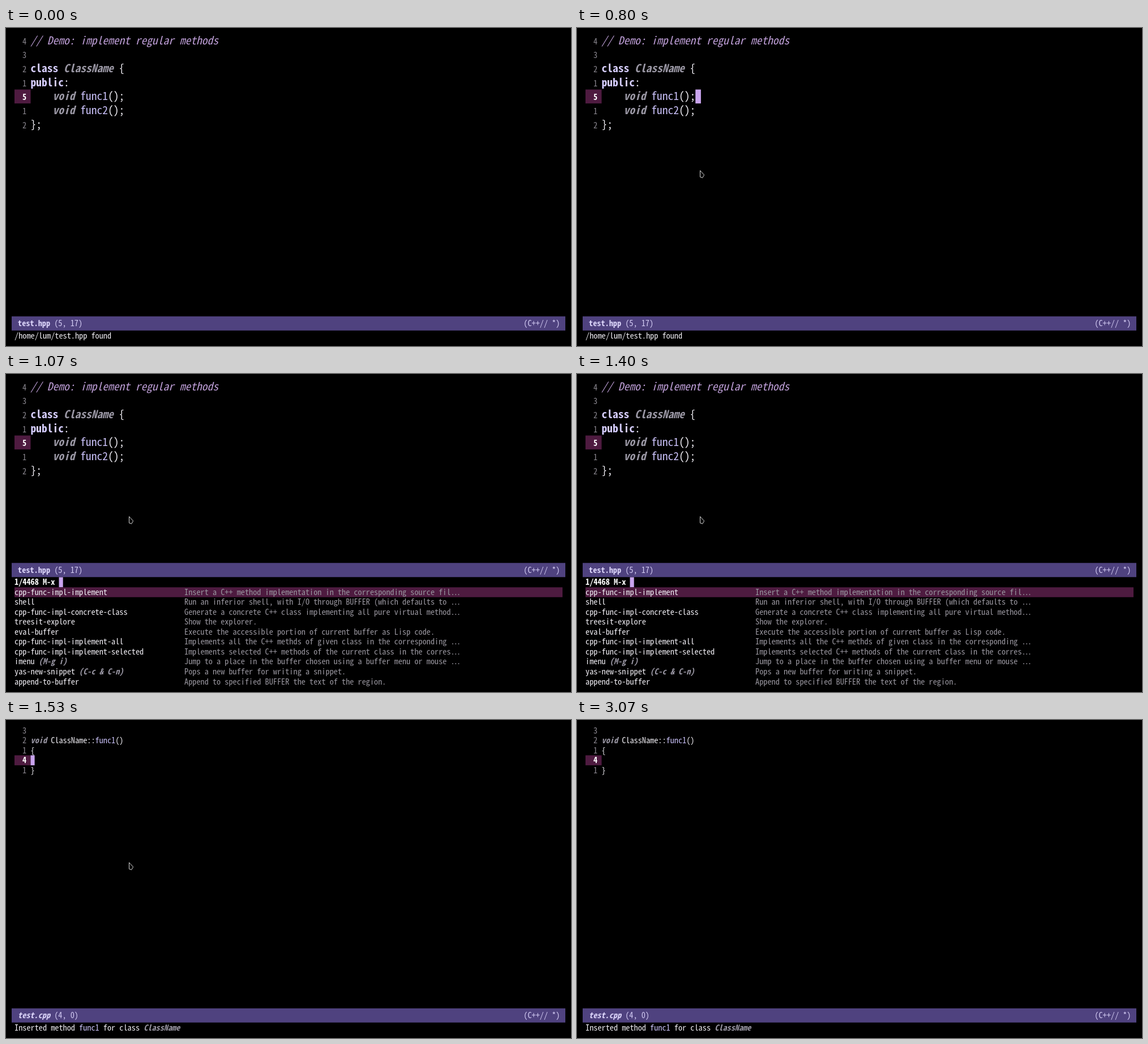
These frames come from a looping animation (998x561 px, 3740 ms). An HTML page:

```html
<!DOCTYPE html>
<html lang="en">
<head>
<meta charset="utf-8">
<title>Implement regular methods</title>
<style>
  html, body { margin: 0; width: 100%; height: 100%; overflow: hidden; background: #000; }
  svg { display: block; width: 100%; height: 100%; }
  text {
    font-family: "Noto Sans Mono CJK JP", "Noto Sans Mono CJK SC", "Noto Sans Mono", "DejaVu Sans Mono", monospace;
    font-variant-ligatures: none;
    white-space: pre;
  }
  .plain { fill: #f0eef4; }
  .name { fill: #c9c0f8; }
  .key { fill: #d6ceff; font-weight: 700; }
  .type { fill: #9a97a4; font-weight: 700; font-style: italic; }
  .note { fill: #bf9fd8; font-style: italic; }
  .dim { fill: #98959e; }
  .num { fill: #8c8991; }
  .now { fill: #fff; font-weight: 700; }
  .bar { fill: #d5cdf5; }
  .file { fill: #dcd5fa; font-weight: 700; }
  .fileNew { fill: #dcd5fa; font-weight: 700; font-style: italic; }
</style>
</head>
<body>
<svg id="stage" viewBox="0 0 998 561"></svg>
<script>
const NS = "http://www.w3.org/2000/svg";
const stage = document.getElementById("stage");
const LOOP = 3740;
const SMALL = 7.13, LARGE = 9.75;
const ROW = 17.55, TALL_ROW = 24.7;
const LEFT = 15, CODE = 43.5;
const WINE = "#4e1b40", LILAC = "#c9a4ee", VIOLET = "#4f427f";

function add(parent, tag, attrs) {
  const el = document.createElementNS(NS, tag);
  for (const k in attrs) el.setAttribute(k, attrs[k]);
  return parent.appendChild(el);
}

const group = () => add(stage, "g", {});

const rect = (parent, x, y, width, height, fill) =>
  add(parent, "rect", { x, y, width, height, fill });

// Font size per unit of pitch: half-width fonts fit at 2, wider ones need less.
function sizeRatio() {
  const probe = add(stage, "text", { "font-size": 100 });
  probe.textContent = "method";
  const advance = probe.getComputedTextLength() / 600;
  probe.remove();
  return advance < 0.55 ? 2 : 1.85;
}
const RATIO = sizeRatio();

// Writes [class, text] runs on a character grid of the given pitch.
function write(parent, x, y, pitch, ...runs) {
  let col = 0;
  for (const [cls, str] of runs) {
    const el = add(parent, "text", {
      x: x + col * pitch, y, class: cls, "font-size": pitch * RATIO
    });
    el.textContent = str;
    const natural = el.getComputedTextLength() / str.length;
    el.style.letterSpacing = (pitch - natural) + "px";
    col += str.length;
  }
}

function modeLine(parent, y, cls, file, pos) {
  rect(parent, 10, y, 978, 25, VIOLET);
  write(parent, 21, y + 17.4, SMALL, [cls, file], ["bar", " " + pos]);
  write(parent, 914.3, y + 17.4, SMALL, ["bar", "(C++// *)"]);
}

function lineNumbers(parent, labels, current, y, step) {
  labels.forEach((label, i) =>
    write(parent, 29, y + i * step, SMALL, [i === current ? "now" : "num", label]));
}

// Header buffer
const header = group();
rect(header, LEFT, 108.5, 28.5, 24.6, WINE);
lineNumbers(header, ["4", "3", "2", "1", "5", "1", "2"], 4, 28.5, TALL_ROW);
[
  [["note", "// Demo: implement regular methods"]],
  [],
  [["key", "class"], ["plain", " "], ["type", "ClassName"], ["plain", " {"]],
  [["key", "public"], ["plain", ":"]],
  [["plain", "    "], ["type", "void"], ["plain", " "], ["name", "func1"], ["plain", "();"]],
  [["plain", "    "], ["type", "void"], ["plain", " "], ["name", "func2"], ["plain", "();"]],
  [["plain", "};"]]
].forEach((runs, i) => write(header, CODE, 28.5 + i * TALL_ROW, LARGE, ...runs));

const headerCursor = rect(stage, 209.2, 108.5, 9.7, 24.6, LILAC);

const found = group();
modeLine(found, 508.7, "file", "test.hpp", "(5, 17)");
write(found, LEFT, 547.7, SMALL, ["plain", "/home/lum/test.hpp found"]);

// Command list
const menu = group();
modeLine(menu, 333.3, "file", "test.hpp", "(5, 17)");
rect(menu, LEFT, 376.3, 968, 17.4, WINE);
write(menu, LEFT, 372, SMALL, ["now", "1/4468 M-x"]);
rect(menu, 93.5, 358.5, 7.2, 17.6, LILAC);
[
  ["cpp-func-impl-implement", "", "Insert a C++ method implementation in the corresponding source fil", 1],
  ["shell", "", "Run an inferior shell, with I/O through BUFFER (which defaults to ", 1],
  ["cpp-func-impl-concrete-class", "", "Generate a concrete C++ class implementing all pure virtual method", 1],
  ["treesit-explore", "", "Show the explorer."],
  ["eval-buffer", "", "Execute the accessible portion of current buffer as Lisp code."],
  ["cpp-func-impl-implement-all", "", "Implements all the C++ methds of given class in the corresponding ", 1],
  ["cpp-func-impl-implement-selected", "", "Implements selected C++ methods of the current class in the corres", 1],
  ["imenu", "(M-g i)", "Jump to a place in the buffer chosen using a buffer menu or mouse ", 1],
  ["yas-new-snippet", "(C-c & C-n)", "Pops a new buffer for writing a snippet."],
  ["append-to-buffer", "", "Append to specified BUFFER the text of the region."]
].forEach(([command, keys, about, cut], i) => {
  const y = 372 + (i + 1) * ROW;
  write(menu, LEFT, y, SMALL, ["plain", command]);
  if (keys) write(menu, LEFT + (command.length + 1) * SMALL, y, SMALL, ["type", keys]);
  write(menu, 315, y, SMALL, ["dim", about]);
  if (cut) [0, 5.2, 10.4].forEach(dx => write(menu, 785.5 + dx, y, SMALL, ["dim", "."]));
});

// Source buffer
const source = group();
rect(source, LEFT, 62.3, 28.5, 17.6, WINE);
lineNumbers(source, ["3", "2", "1", "4", "1"], 3, 23.8, ROW);
write(source, CODE, 41.3, SMALL, ["type", "void"], ["plain", " ClassName::"], ["name", "func1"], ["plain", "()"]);
write(source, CODE, 58.9, SMALL, ["plain", "{"]);
write(source, CODE, 94, SMALL, ["plain", "}"]);
modeLine(source, 508.7, "fileNew", "test.cpp", "(4, 0)");
write(source, LEFT, 547.7, SMALL,
  ["plain", "Inserted method "], ["name", "func1"], ["plain", " for class "], ["type", "ClassName"]);

const sourceCursor = rect(stage, CODE, 62.3, 7.1, 17.6, LILAC);

const pointer = add(stage, "path", {
  d: "M.5 .5V11.8L4.6 13.3 7.6 8.2Z",
  fill: "#000", stroke: "#d8d8d8", "stroke-width": 1, "stroke-linejoin": "round"
});

// Pointer stops: [time, x, y]
const stops = [
  [70, 0, 284], [130, 48, 278], [200, 108, 269], [270, 158, 261],
  [330, 192, 255], [400, 210, 252], [470, 217, 251],
  [2870, 216, 249], [2930, 140, 257], [3000, 17, 268]
];

const show = (el, on) => { el.style.display = on ? "" : "none"; };

function draw(t) {
  const inside = t >= 70 && t < 3070;
  const menuOpen = t >= 870 && t < 1470;
  const inSource = t >= 1470;
  show(header, !inSource);
  show(found, t < 870);
  show(menu, menuOpen);
  show(source, inSource);
  show(headerCursor, t >= 130 && t < 870);
  show(sourceCursor, inSource && inside);
  show(pointer, inside);
  if (inside) {
    const [, x, y] = stops.filter(s => s[0] <= t).pop();
    pointer.setAttribute("transform", `translate(${x} ${y})`);
  }
}

const start = performance.now();
function tick() {
  draw((performance.now() - start) % LOOP);
  requestAnimationFrame(tick);
}
tick();
</script>
</body>
</html>
```
